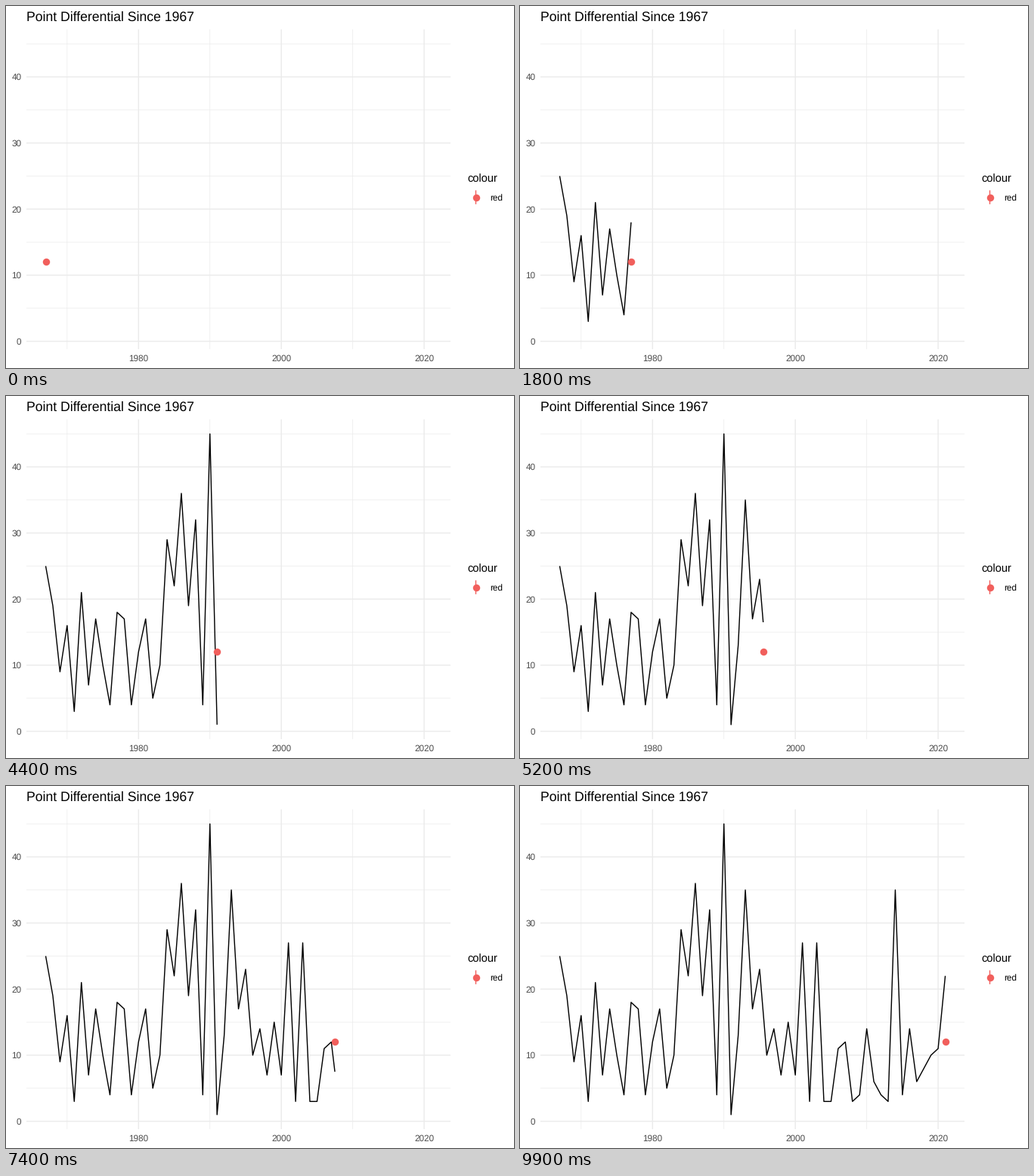
Animation, 672 px wide and 480 px high, one loop 10 s. Source, as a matplotlib script:

```python
import numpy as np
import matplotlib.pyplot as plt
from matplotlib.animation import FuncAnimation
from matplotlib.lines import Line2D

W, H, DPI = 672, 480, 96
FRAMES, LOOP_MS = 100, 10000
LEFT, RIGHT, TOP, BOTTOM = 27.0, 588.05, 30.9, 455.1
RED, GRID, GREY = "#F15F5C", "#EBEBEB", "#4D4D4D"
THIN, THICK, DOT = 0.533, 1.067, 7.1

plt.rcParams.update({"font.family": "Liberation Sans", "text.hinting": "none"})

FIRST = 1967
margins = np.array([
    25, 19, 9, 16, 3, 21, 7, 17, 10, 4,
    18, 17, 4, 12, 17, 5, 10, 29, 22, 36,
    19, 32, 4, 45, 1, 13, 35, 17, 23, 10,
    14, 7, 15, 7, 27, 3, 27, 3, 3, 11,
    12, 3, 4, 14, 6, 4, 3, 35, 4, 14,
    6, 8, 10, 11, 22])
years = FIRST + np.arange(len(margins))
# Each year is reached on a whole frame; frames between are interpolated.
year_frames = np.round((FRAMES - 1) * (years - FIRST) / (len(years) - 1))

fig = plt.figure(figsize=(W / DPI, H / DPI), dpi=DPI, facecolor="white")
ax = fig.add_axes([LEFT / W, 1 - BOTTOM / H, (RIGHT - LEFT) / W, (BOTTOM - TOP) / H])
ax.set_xlim(1964.3, 2023.7)
ax.set_ylim(-1.2, 47.2)
ax.axis("off")


def label(x, y, text, size, color="black", ha="left"):
    """Place text with its baseline at a pixel position from the top left."""
    fig.text(x / W, 1 - y / H, text, fontsize=size, color=color, ha=ha, va="baseline")


def px(x, y):
    """Pixel position, from the top left, of a data point."""
    u, v = ax.transLimits.transform((x, y))
    return LEFT + u * (RIGHT - LEFT), BOTTOM - v * (BOTTOM - TOP)


def grid(xs, ys, width):
    style = dict(color=GRID, lw=width, snap=False, solid_capstyle="butt", zorder=1)
    for y in ys:
        ax.axhline(y, **style)
    for x in xs:
        ax.axvline(x, **style)


grid((1970, 1990, 2010), range(5, 46, 10), THIN)
grid((1980, 2000, 2020), range(0, 41, 10), THICK)

label(LEFT, 20, "Point Differential Since 1967", 13.2)
for value in range(0, 41, 10):
    label(20.4, px(FIRST, value)[1] + 4.2, str(value), 8.8, GREY, "right")
for year in (1980, 2000, 2020):
    label(px(year, 0)[0], 471, str(year), 8.8, GREY, "center")

# Legend
label(610, 234, "colour", 11)
label(640.4, 258, "red", 8.8)
key_x, key_y = 621.5 / W, 1 - 253.6 / H
half = 9.2 / H
fig.add_artist(Line2D([key_x, key_x], [key_y - half, key_y + half], color=RED,
                      lw=THICK, solid_capstyle="butt", snap=False))
fig.add_artist(Line2D([key_x], [key_y], color=RED, marker="o", ms=DOT, mew=0,
                      ls="none", snap=False))

line, = ax.plot([], [], color="black", lw=THICK, solid_capstyle="butt",
                solid_joinstyle="round", snap=False, zorder=3)
dot, = ax.plot([], [], color=RED, marker="o", ms=DOT, mew=0, ls="none",
               snap=False, zorder=4)


def draw(frame):
    now = np.interp(frame, year_frames, years)
    past = years < now
    line.set_data(np.append(years[past], now),
                  np.append(margins[past], np.interp(now, years, margins)))
    dot.set_data([now], [12])
    return line, dot


anim = FuncAnimation(fig, draw, frames=FRAMES, interval=LOOP_MS / FRAMES,
                     init_func=lambda: draw(0), repeat=True, repeat_delay=0)
plt.show()
```
